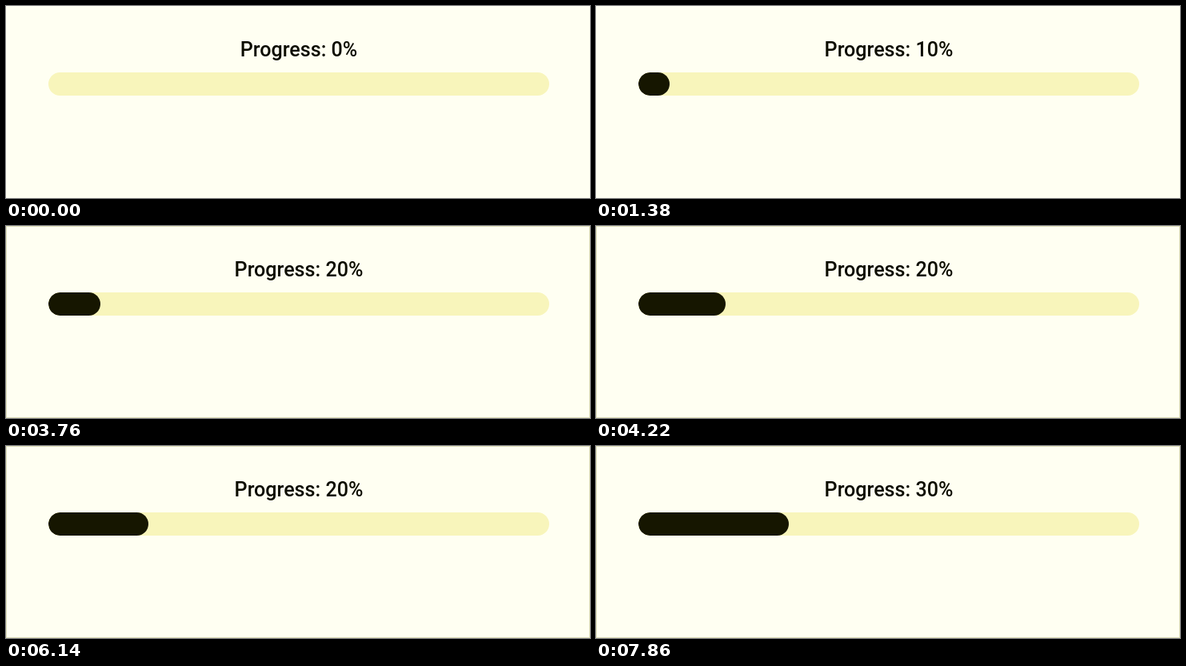
Recreate the animation shown at these times as an HTML page. Size 730 px wide and 240 px high, loop 8 s.

```html
<!DOCTYPE html>
<html lang="en">
<head>
<meta charset="utf-8">
<title>Progress</title>
<style>
  html, body { margin: 0; width: 100%; height: 100%; overflow: hidden; background: #fffff2; }
  .stage { position: relative; width: 730px; height: 240px; overflow: hidden; }
  .frame { position: absolute; inset: 0; border: 1px solid #dedeb8; visibility: hidden; }
  .label {
    position: absolute; left: 1px; top: 40px; width: 730px;
    font: 500 25.1px/30px Roboto, sans-serif; text-align: center; color: #0c0c00;
  }
  .track, .fill { height: 29px; border-radius: 14.5px; }
  .track {
    position: absolute; left: 53px; top: 83px; width: 625.5px;
    overflow: hidden; background: #f8f5bb;
  }
  .fill { width: 0; background: #161600; }
</style>
</head>
<body>
<div class="stage">
  <div class="frame"></div>
  <div class="label">Progress: 0%</div>
  <div class="track"><div class="fill"></div></div>
</div>
<script>
const LOOP = 8000;
const STEP_TIMES = [850, 3605, 6345];
const STEP_PERCENT = 10;
const GROW_MS = 1300;
const FRAME_AT = 2520;

const [frame, label, fill] = ['.frame', '.label', '.fill'].map(s => document.querySelector(s));

// cubic-bezier(0.4, 0, 0.2, 1), solved for its parameter by bisection
function standardEase(x) {
  if (x <= 0) return 0;
  if (x >= 1) return 1;
  const bezier = (s, a, b) => 3 * (1 - s) ** 2 * s * a + 3 * (1 - s) * s * s * b + s ** 3;
  let low = 0, high = 1;
  for (let i = 0; i < 24; i++) {
    const mid = (low + high) / 2;
    if (bezier(mid, 0.4, 0.2) < x) low = mid; else high = mid;
  }
  return bezier(low, 0, 1);
}

function draw(time) {
  const percent = STEP_PERCENT * STEP_TIMES.filter(start => time >= start).length;
  const shown = STEP_TIMES.reduce(
    (sum, start) => sum + STEP_PERCENT * standardEase((time - start) / GROW_MS), 0);
  const text = `Progress: ${percent}%`;
  if (label.textContent !== text) label.textContent = text;
  fill.style.width = `${shown}%`;
  frame.style.visibility = time >= FRAME_AT ? 'visible' : 'hidden';
}

const began = performance.now();
function tick() {
  draw((performance.now() - began) % LOOP);
  requestAnimationFrame(tick);
}
tick();
</script>
</body>
</html>
```
